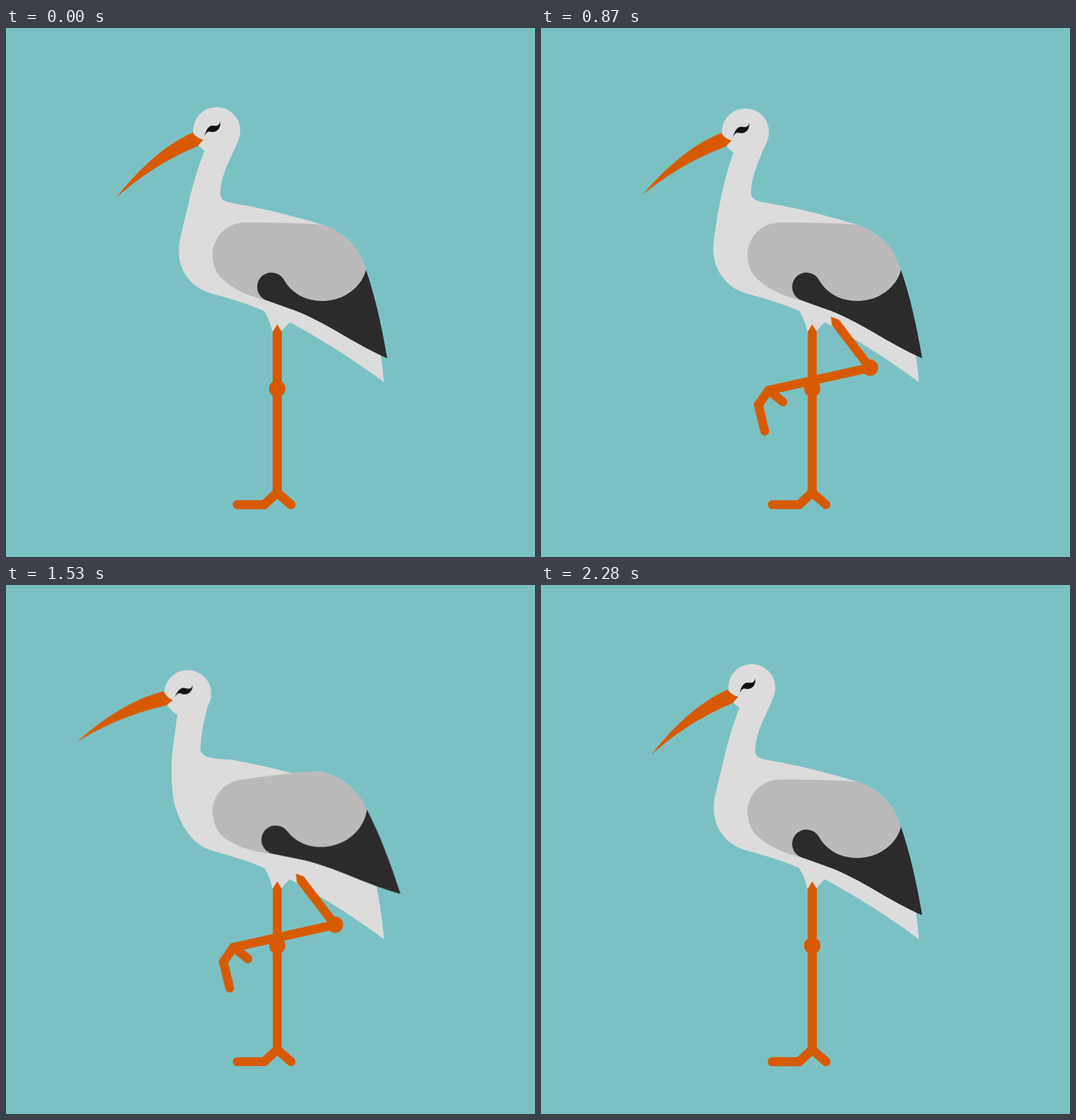
Animation of 748x748 px, one loop 2310 ms. Source, as an HTML page:

```html
<!DOCTYPE html>
<html lang="en">
<head>
<meta charset="utf-8">
<title>Stork</title>
<style>
  html, body { margin: 0; width: 100%; height: 100%; overflow: hidden; background: #7bc1c4; }
  svg { display: block; width: 100vw; height: 100vh; }

  .white { fill: #dcdcdc; }
  .grey { fill: #bababa; }
  .black { fill: #2b2b2b; }
  .orange { fill: #d85a00; }
  .bone { fill: none; stroke: #d85a00; stroke-width: 12.6; stroke-linecap: round; stroke-linejoin: round; }

  /* One shared clock; the curve is an exact smoothstep. */
  .move { animation: 2310ms cubic-bezier(.3333, 0, .6667, 1) infinite; }

  .hip   { transform-origin: 380.5px 374.5px; animation-name: hip; }
  .knee  { transform-origin: 383.5px 510px; animation-name: knee; }
  .ankle { transform-origin: 383.5px 657px; animation-name: ankle; }
  .toe   { transform-origin: 365px 674px; animation-name: toe; }
  .spur  { transform-origin: 383.5px 657px; animation-name: spur; }
  .wing  { transform-origin: 338px 321px; animation-name: wing; }
  .head  { transform-origin: 298px 145px; animation-name: head; }
  .body  { animation-name: neck; }
  .eye   { fill: #111; animation-name: blink; }

  @keyframes hip {
    0%, 13.42%, 84.416%, 100% { transform: rotate(0deg); }
    32.468%, 66.234% { transform: rotate(-37.4deg); }
  }
  @keyframes knee {
    0%, 13.42%, 84.416%, 100% { transform: rotate(0deg); }
    28.05%, 72.34% { transform: rotate(114.8deg); }
  }
  @keyframes ankle {
    0%, 13.42%, 84.416%, 100% { transform: rotate(0deg); }
    26.41%, 73.59% { transform: rotate(-90deg); }
  }
  @keyframes toe {
    0%, 13.42%, 84.416%, 100% { transform: rotate(0deg); }
    28.05%, 72.34% { transform: rotate(-91deg); }
  }
  @keyframes spur {
    0%, 13.42%, 84.416%, 100% { transform: rotate(0deg); }
    32.468%, 66.234% { transform: rotate(-80deg); }
  }
  /* Three quick flaps */
  @keyframes wing {
    0%, 46.537%, 55.368%, 64.199%, 73.03%, 100% { transform: rotate(0deg); }
    50.952%, 59.784%, 68.615% { transform: rotate(-18deg); }
  }
  @keyframes head {
    0%, 33.766%, 98.701%, 100% { transform: translate(0px, 0px) rotate(0deg); }
    46.753%, 85.714% { transform: translate(-41px, 8.5px) rotate(10.2deg); }
  }
  @keyframes neck {
    0%, 33.766%, 98.701%, 100% {
      d: path("M283,168 C272,194 266,216 260,240 C255,261 250,281 246,299 C238,336 258,368 293,376 C318,383 342,390 365,400 C371,409 374,418 377,430 L390,428 L401,416 C440,437 485,464 534.5,501 C532,470 525,425 518,400 C512,375 505,350 497,335 C486,308 470,290 450,279 C410,267 370,256 318,247 C306,245 302,240 303,232 C304,212 312,195 322,174 C326,165 330,158 331,147 Z");
    }
    46.753%, 85.714% {
      d: path("M243,180 C240,200 238,215 235,238 C233,256 234,290 238,309 C243,327 258,368 293,376 C318,383 342,390 365,400 C371,409 374,418 377,430 L390,428 L401,416 C440,437 485,464 534.5,501 C532,470 525,425 518,400 C512,375 505,350 497,335 C486,308 470,290 450,279 C410,267 370,256 318,247 C300,246 277,246 275,233 C275,215 279,195 285,172 C287,165 290,160 290,154 Z");
    }
  }
  @keyframes blink {
    0%, 70.13%, 77.922%, 100% {
      d: path("M281,153 C283,142 288,137 293,138 C298,139 302,138 303,132 C304,140 300,147 292,147 C287,147 285,144 281,153 Z");
    }
    74.026% {
      d: path("M281,153 C284,144 287,140.5 293,141.5 C298,143 302,139 303,132 C304,140 300,146 294,145.5 C288,144.5 285,143 281,153 Z");
    }
  }
</style>
</head>
<body>
<svg viewBox="0 0 748 748">
  <defs>
    <path id="thigh" class="orange" d="M383.5,419 L389.8,429.5 V510 H377.2 V429.5 Z"/>
    <circle id="joint" class="orange" cx="383.5" cy="510" r="11.5"/>
    <path id="shin" class="bone" d="M383.5,510 V657"/>
    <path id="instep" class="bone" d="M383.5,657 L365,674"/>
    <path id="front" class="bone" d="M365,674 H327"/>
    <path id="back" class="bone" d="M383.5,657 L403,674"/>
  </defs>

  <path class="white body move"/>

  <!-- standing leg -->
  <use href="#thigh"/><use href="#joint"/><use href="#shin"/>
  <use href="#instep"/><use href="#front"/><use href="#back"/>

  <!-- lifted leg -->
  <g class="hip move">
    <path class="white" d="M355,385 L365,400 C371,409 374,418 377,430 L390,428 L401,416 L395,390 Z"/>
    <use href="#thigh"/><use href="#joint"/>
    <g class="knee move">
      <use href="#shin"/>
      <g class="ankle move">
        <use href="#instep"/>
        <g class="toe move"><use href="#front"/></g>
      </g>
      <g class="spur move"><use href="#back"/></g>
    </g>
  </g>

  <g class="wing move">
    <path class="grey" d="M338,275 C312,275 292,296 292,321 C292,338 300,350 306,355 C322,370 342,378 366,385 L447,386 C478,386 503,365 509,342 C500,310 478,288 450,279 C435,276 380,275 338,275 Z"/>
    <path class="black" d="M509,342 C503,366 478,386 447,386 C420,386 402,372 393,356 A20.3 20.3 0 1 0 368,385 L410,400 C450,415 495,448 539,467 C531,420 522,380 509,342 Z"/>
  </g>

  <g class="head move">
    <circle class="white" cx="298" cy="145" r="33.3"/>
    <path class="orange" d="M264,148 Q270,156 279,158 L271,167 C235,182 195,205 156,240 C184,204 222,166 264,148 Z"/>
    <path class="eye move"/>
  </g>
</svg>
</body>
</html>
```
